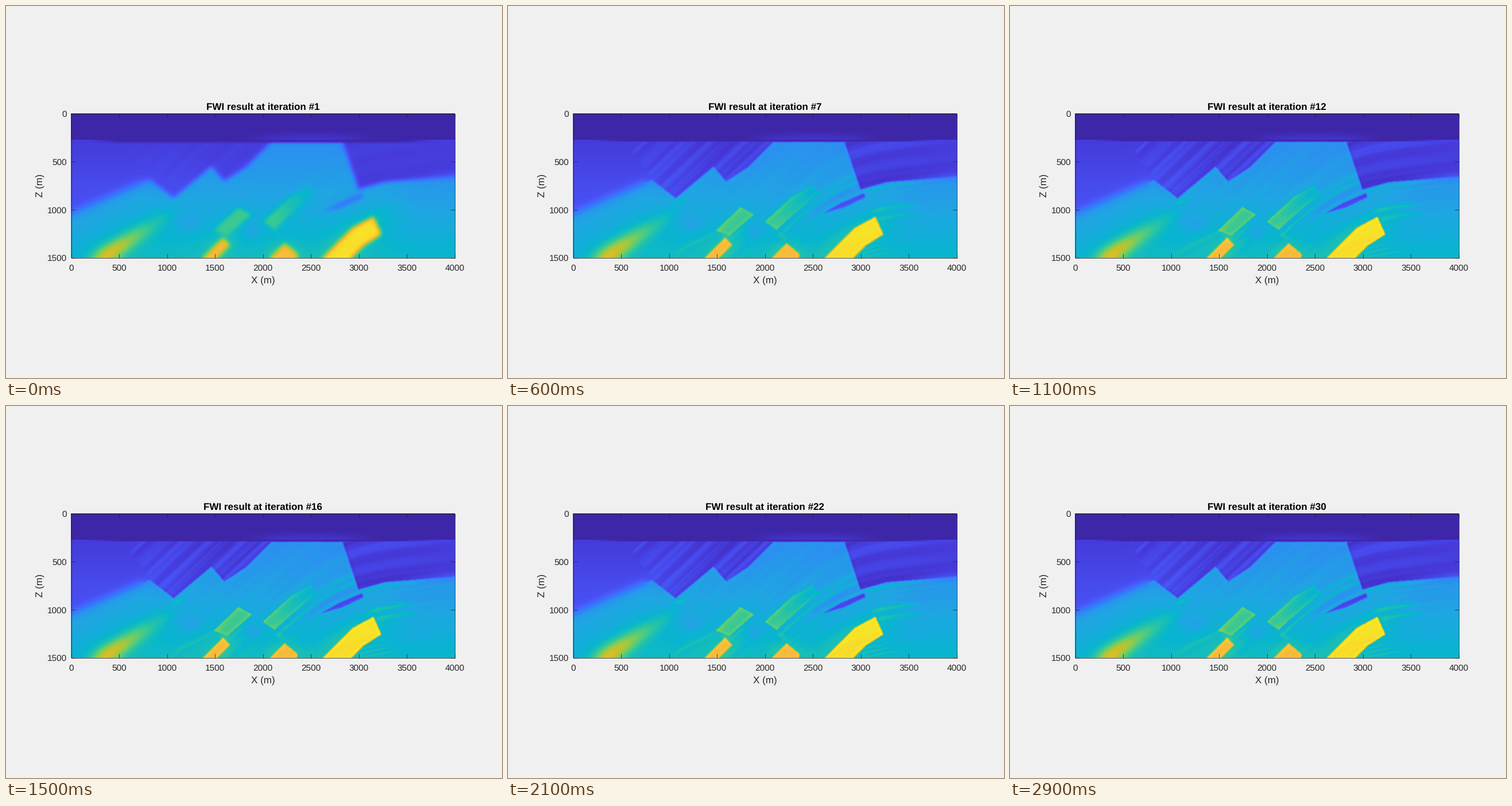
A matplotlib script for the animation above (3000 ms loop, 864x648 px).

```python
import numpy as np
import matplotlib.pyplot as plt
from matplotlib.animation import FuncAnimation
from matplotlib.colors import LinearSegmentedColormap
from matplotlib.patches import Rectangle
from matplotlib.path import Path

plt.rcParams["font.family"] = "Liberation Sans"
plt.rcParams["text.hinting"] = "none"

W, H, FRAMES = 864, 648, 30
LEFT, RIGHT, TOP, BOTTOM = 113.5, 781.5, 187.5, 438.5
INK = "#262626"

STOPS = ("3e26a8 4537d5 484df0 4563fd 327cfc 2b91ef 20a5e3 08b5d0 19bfb6 "
         "37c897 64cd6f 9dc943 d1bf27 f8ba3d fccf30 f5e924 f9fb15").split()
CMAP = LinearSegmentedColormap.from_list("velocity", ["#" + s for s in STOPS])

rng = np.random.default_rng(4)
xs = np.arange(LEFT, RIGHT + 1)
X, Y = np.meshgrid(xs, np.arange(TOP, BOTTOM + 1))


def ramp(a, lo, hi):
    return np.clip((a - lo) / (hi - lo), 0, 1)


def glow(cx, cy, rx, ry, slope=0):
    angle = np.arctan(slope)
    dx, dy = X - cx, Y - cy
    u = dx * np.cos(angle) + dy * np.sin(angle)
    v = dy * np.cos(angle) - dx * np.sin(angle)
    return np.exp(-(u / rx) ** 2 - (v / ry) ** 2)


def inside(*pts):
    grid = np.column_stack([X.ravel(), Y.ravel()])
    return Path(pts).contains_points(grid).reshape(X.shape)


def blur(a, sigma):
    r = int(3 * sigma) + 1
    kernel = np.exp(-0.5 * (np.arange(-r, r + 1) / sigma) ** 2)
    kernel /= kernel.sum()
    a = np.pad(a, r, mode="edge")
    for axis in (0, 1):
        a = np.apply_along_axis(np.convolve, axis, a, kernel, "valid")
    return a


# Bedding: steep on the left, bending to nearly flat on the right
Q = Y - (297.5 - .1 * (X - 605) + 29.75 * np.logaddexp(0, (575 - X) / 35))


def strata(spacing):
    """Random layering that follows the bedding, within -1..1."""
    knots = np.arange(-600, 300, spacing)
    return np.interp(Q, knots, rng.uniform(-1, 1, len(knots)))


def bed(q, width, x0, x1):
    """One layer along the bedding, fading out at both ends."""
    ends = ramp(X, x0, x0 + 15) * ramp(-X, -x1, 30 - x1)
    return ends * np.exp(-((Q - q) / width) ** 2)


# Base of the slow upper blocks, and the fault left of them
FLOOR = [(113, 362), (250, 303), (292, 335), (358, 280), (380, 306),
         (420, 280), (462, 237), (586, 237), (614, 320), (660, 307),
         (782, 297)]
slow = Y < np.interp(xs, *zip(*FLOOR))
fault = np.minimum(205 + .7 * (Y - 237), 285)

LENS = inside((547, 362), (580, 343), (620, 326), (623, 333), (585, 351))
GREEN = [inside((362, 391), (405, 350), (429, 363), (386, 400)),
         inside((447, 376), (495, 332), (530, 312), (540, 325), (468, 390))]
YELLOW = [inside((342, 440), (378, 404), (390, 416), (366, 440)),
          inside((459, 440), (485, 413), (508, 432), (507, 440)),
          inside((551, 440), (605, 386), (640, 367), (654, 398), (622, 418),
                 (600, 440))]


def build_rock():
    fast = .31 + .16 * ramp(Y, 238, 438) ** 1.2
    fast -= .02 * ramp(X, 650, 710) + .04 * ramp(-X, -220, -120)
    dark = .08 + .05 * ramp(Y, 240, 330) * ramp(-X, -460, -330)
    rock = np.where(slow, dark, fast)
    for t in np.linspace(0, 1, 4):
        rock += (.34 - .24 * t) * glow(172 + 96 * t, 435 - 62 * t,
                                       30 - 6 * t, 14 - 3 * t, -.6)
    rock += .10 * (glow(600, 408, 65, 24, -.85) + glow(370, 424, 30, 18, -.8)
                   + glow(485, 430, 30, 16))
    rock -= .05 * (glow(318, 378, 22, 14) + glow(428, 392, 14, 14))
    rock[LENS] -= .14
    for body in GREEN:
        rock = np.where(body, .57 - .17 * ramp(X, 470, 540), rock)
    for body, value in zip(YELLOW, (.82, .82, .92)):
        rock = np.where(body, value, rock)
    return rock


def build_detail(rock):
    detail = .45 * (rock - blur(rock, 4))
    broad, fine = strata(8), strata(5)
    blocks = slow & (X > fault)
    bent = ~slow & (X > 490)
    detail += blocks * (.045 * broad + .025 * fine)
    detail += (~slow & (X > 290)) * .02 * broad
    detail += bent * .04 * np.exp(-((Q - 15) / 55) ** 2) * fine
    for body in GREEN:
        detail += .16 * body * (1 - blur(body.astype(float), 3))
    for q, width, x0, x1, gain in [
            (0, 3.5, 470, 630, .13), (-14, 3, 500, 625, .06),
            (12, 6, 520, 615, -.06), (57, 4, 628, 720, .13),
            (73, 4, 638, 730, .10), (20, 3, 612, 740, .07)]:
        detail += gain * ~slow * bed(q, width, x0, x1)
    detail += .08 * glow(642, 424, 28, 14) * np.sin(.8 * Q)
    detail += .13 * glow(297, 341, 13, 3, -.35)
    detail += .08 * glow(330, 410, 45, 3, -.51)
    detail += .10 * (glow(407, 390, 26, 3, -.9) + glow(378, 402, 10, 5, .5)
                     + glow(477, 400, 10, 4, .7))
    return detail - .17 * LENS


rock = build_rock()
detail = build_detail(rock)
smooth = blur(rock, 8)
soft = np.maximum(ramp(fault - X, -12, 22), .6 * ramp(X, 690, 770))
surface = ramp(X, 140, 200) * ramp(-X, -755, -690)
haze = .055 * np.exp(-((X - 530) / 95) ** 4) * ramp(Y, 217, 232)


def velocity(k):
    fade = np.exp(-k / 3)
    sigma = 1.1 + 2.5 * fade
    gain = 1 - .6 * fade - .15 * np.exp(-k / 15)
    sharp = .88 * blur(rock + gain * detail, sigma) + .12 * smooth
    v = sharp * (1 - soft) + smooth * soft
    v *= 1 - surface * (1 - ramp(Y, 235, 236.5 + 4 * fade))
    return np.where(Y < 233, haze, v)


fig = plt.figure(figsize=(W / 72, H / 72), dpi=72, facecolor="#f0f0f0")
ax = fig.add_axes([0, 0, 1, 1])
ax.axis("off")
image = ax.imshow(velocity(0), cmap=CMAP, vmin=0, vmax=1, aspect="auto",
                  interpolation="nearest",
                  extent=(LEFT - .5, RIGHT + .5, BOTTOM + .5, TOP - .5))
ax.set_xlim(0, W)
ax.set_ylim(H, 0)
ax.add_patch(Rectangle((LEFT, TOP), RIGHT - LEFT, BOTTOM - TOP, fill=False,
                       ec=INK, lw=.8, zorder=3))


def tick(x0, y0, x1, y1):
    ax.plot([x0, x1], [y0, y1], color=INK, lw=.8, zorder=3)


def label(x, y, s, size=16.95, ha="center", color=INK, **kw):
    return ax.text(x, y, s, fontsize=size, ha=ha, va="baseline",
                   color=color, rotation_mode="anchor", **kw)


SIZE = 6.7
for metres in range(0, 4001, 500):
    x = LEFT + (RIGHT - LEFT) * metres / 4000
    tick(x, BOTTOM, x, BOTTOM - SIZE)
    tick(x, TOP, x, TOP + SIZE)
    label(x, 460.5, str(metres), 15.4)
for metres in range(0, 1501, 500):
    y = TOP + (BOTTOM - TOP) * metres / 1500
    tick(LEFT, y, LEFT + SIZE, y)
    tick(RIGHT, y, RIGHT - SIZE, y)
    label(105.8, y + 5.8, str(metres), 15.4, ha="right")
label(447.3, 482.3, "X (m)")
label(63.5, 313, "Z (m)", rotation=90)
title = label(447.3, 180.8, "", weight="bold", color="black")


def update(k):
    image.set_data(velocity(k))
    title.set_text(f"FWI result at iteration #{k + 1}")
    return image, title


anim = FuncAnimation(fig, update, frames=FRAMES, interval=100, repeat=True)
plt.show()
```
